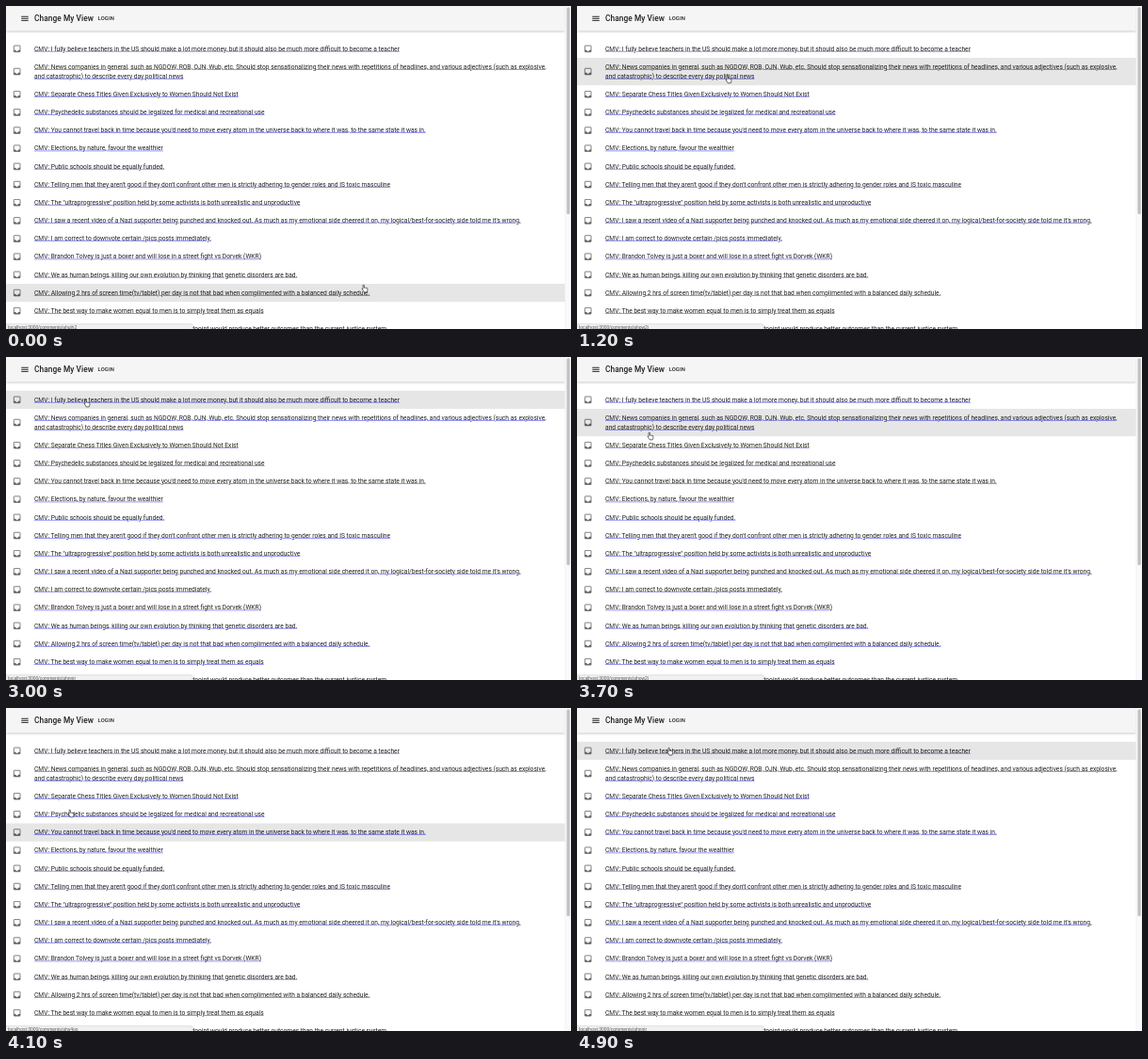
An HTML page for the animation above (5 s loop, 600 by 343 pixels).

```html
<!DOCTYPE html>
<html lang="en">
<head>
<meta charset="utf-8">
<title>Change My View</title>
<style>
  html, body { margin: 0; width: 100%; height: 100%; overflow: hidden; background: #fff; }
  /* The page is laid out at 1440 px wide and shown at 600 px. */
  #page {
    position: absolute; left: 0; top: 0; width: 1440px; height: 823.2px; overflow: hidden;
    transform: scale(.4166667); transform-origin: 0 0;
    font: 16px/24px Roboto, sans-serif; color: rgba(0, 0, 0, .87);
  }
  #page > * { position: absolute; }
  header {
    left: 0; top: 0; width: 1425px; height: 64px; background: #f5f5f5;
    box-shadow: 0 2px 4px -1px #0003, 0 4px 5px #0002, 0 1px 10px #0002;
    font-weight: 500; line-height: 64px; white-space: nowrap;
  }
  header > * { position: absolute; }
  header svg { left: 36px; top: 20px; }
  h1 { left: 72px; margin: 0; font-size: 20px; font-weight: 500; letter-spacing: .0075em; }
  .login { left: 234px; font-size: 14px; letter-spacing: .02857em; }
  #list { left: 0; top: 86px; width: 1425px; }
  .row { display: flex; align-items: center; gap: 32px; padding: 11px 16px; }
  .row.hover { background: #e6e6e6; }
  .row svg { flex: none; opacity: .6; }
  .row span { white-space: nowrap; text-decoration: underline #00e; }
  #next { right: 470px; top: 811px; white-space: nowrap; }
  #status {
    left: -1px; top: 810px; width: 477px; height: 20px; box-sizing: border-box; padding-left: 5px;
    background: #f1f1f1; border: 1px solid #bbb; border-top-right-radius: 5px;
    font: 12px/18px "Liberation Sans", sans-serif; color: #555;
  }
  #track { left: 1425px; top: 0; width: 14px; height: 824px; background: #fafafa; border-left: 1px solid #e7e7e7; }
  #track i { position: absolute; left: 3px; top: 3px; width: 8px; height: 528px; border-radius: 4px; background: #c1c1c1; }
  #hand { left: -8px; top: -10px; overflow: visible; }
</style>
</head>
<body>
<div id="page">
  <div id="list"></div>
  <div id="next">CMV: A restorative justice standpoint would produce better outcomes than the current justice system</div>
  <header>
    <svg width="24" height="24"><path d="M3 7h18M3 12h18M3 17h18" stroke="#000" stroke-width="2"/></svg>
    <h1>Change My View</h1>
    <span class="login">LOGIN</span>
  </header>
  <div id="track"><i></i></div>
  <div id="status"></div>
  <svg id="hand" width="17" height="21">
    <path fill="#fff" stroke="#000" stroke-width="1.4" stroke-linejoin="round" d="M3.4 11V2.4a1.6 1.6 0 0 1 3.2 0V8q1.5-1 3 .4 1.500-.9 2.700.6 2.600-.9 2.600 1.300v3q0 2.500-1.600 6H6.100Q5 16 1.200 12q-.5-2.500 2.200-1z"/>
  </svg>
</div>
<script>
const titles = [
  "I fully believe teachers in the US should make a lot more money, but it should also be much more difficult to become a teacher",
  "News companies in general, such as NGDQW, RQB, QJN, Wub, etc. Should stop sensationalizing their news with repetitions of headlines, and various adjectives (such as explosive,<br>and catastrophic) to describe every day political news",
  "Separate Chess Titles Given Exclusively to Women Should Not Exist",
  "Psychedelic substances should be legalized for medical and recreational use",
  "You cannot travel back in time because you'd need to move every atom in the universe back to where it was, to the same state it was in.",
  "Elections, by nature, favour the wealthier",
  "Public schools should be equally funded.",
  "Telling men that they aren't good if they don't confront other men is strictly adhering to gender roles and IS toxic masculine",
  "The \"ultraprogressive\" position held by some activists is both unrealistic and unproductive",
  "I saw a recent video of a Nazi supporter being punched and knocked out. As much as my emotional side cheered it on, my logical/best-for-society side told me it's wrong.",
  "I am correct to downvote certain /pics posts immediately.",
  "Brandon Tolvey is just a boxer and will lose in a street fight vs Dorvek (WKR)",
  "We as human beings, killing our own evolution by thinking that genetic disorders are bad.",
  "Allowing 2 hrs of screen time(tv/tablet) per day is not that bad when complimented with a balanced daily schedule.",
  "The best way to make women equal to men is to simply treat them as equals"
];
const ids = "ahnnjr ahow2j ahfxkk ahs4oo ahsdpd ahqtty ahrskc ahtove ahpmmd ahvxxa ahmwwu ahleez ahubbn ahuih2 ahkksg".split(" ");

// pointer path: time, x, y
const path = [
  [0, 381, 300], [500, 381, 301], [600, 374, 289], [700, 342, 240], [800, 268, 162],
  [900, 208, 108], [1000, 200, 104], [1200, 161, 78], [1700, 159, 75], [2000, 102, 52],
  [2200, 86, 49], [3000, 86, 49], [3100, 88, 51], [3300, 88, 51], [3500, 84, 57],
  [3700, 78, 84], [3800, 74, 110], [3900, 71, 148], [4000, 70, 133], [4100, 69, 112],
  [4400, 95, 50], [4500, 98, 47], [5000, 99, 46]
];

const $ = id => document.getElementById(id);
const inbox = `<svg width="24" height="24"><rect x="4" y="4" width="16" height="16" rx="1" fill="none" stroke="#000" stroke-width="2"/><path d="M4 15h5a3 3 0 0 0 6 0h5v5H4z"/></svg>`;
$("list").innerHTML = titles.map(t => `<div class="row">${inbox}<span>CMV: ${t}</span></div>`).join("");
const rows = [...$("list").children];

function pointer(t) {
  const i = path.findIndex(k => k[0] > t);
  const [t0, x0, y0] = path[i - 1], [t1, x1, y1] = path[i];
  const f = (t - t0) / (t1 - t0);
  return [(x0 + (x1 - x0) * f) * 2.4, (y0 + (y1 - y0) * f) * 2.4];
}

function rowAt(t) {
  const y = pointer(t)[1] - 7 - 86; // fingertip, relative to the list
  return rows.findIndex(r => r.offsetTop + r.offsetHeight > y);
}

function draw(now) {
  const t = Math.floor(now % 5000 / 100) * 100; // the picture steps ten times a second
  const lag = t > 3500 ? 100 : 0; // the highlight trails the second sweep
  const [x, y] = pointer(t), lit = rowAt(t - lag);
  $("hand").style.transform = `translate(${x}px, ${y}px)`;
  rows.forEach((row, n) => row.classList.toggle("hover", n === lit));
  $("status").textContent = "localhost:3000/comments/" + ids[rowAt(t - lag * .3)];
}

const start = performance.now();
function tick() {
  draw(performance.now() - start);
  requestAnimationFrame(tick);
}
tick();
</script>
</body>
</html>
```
